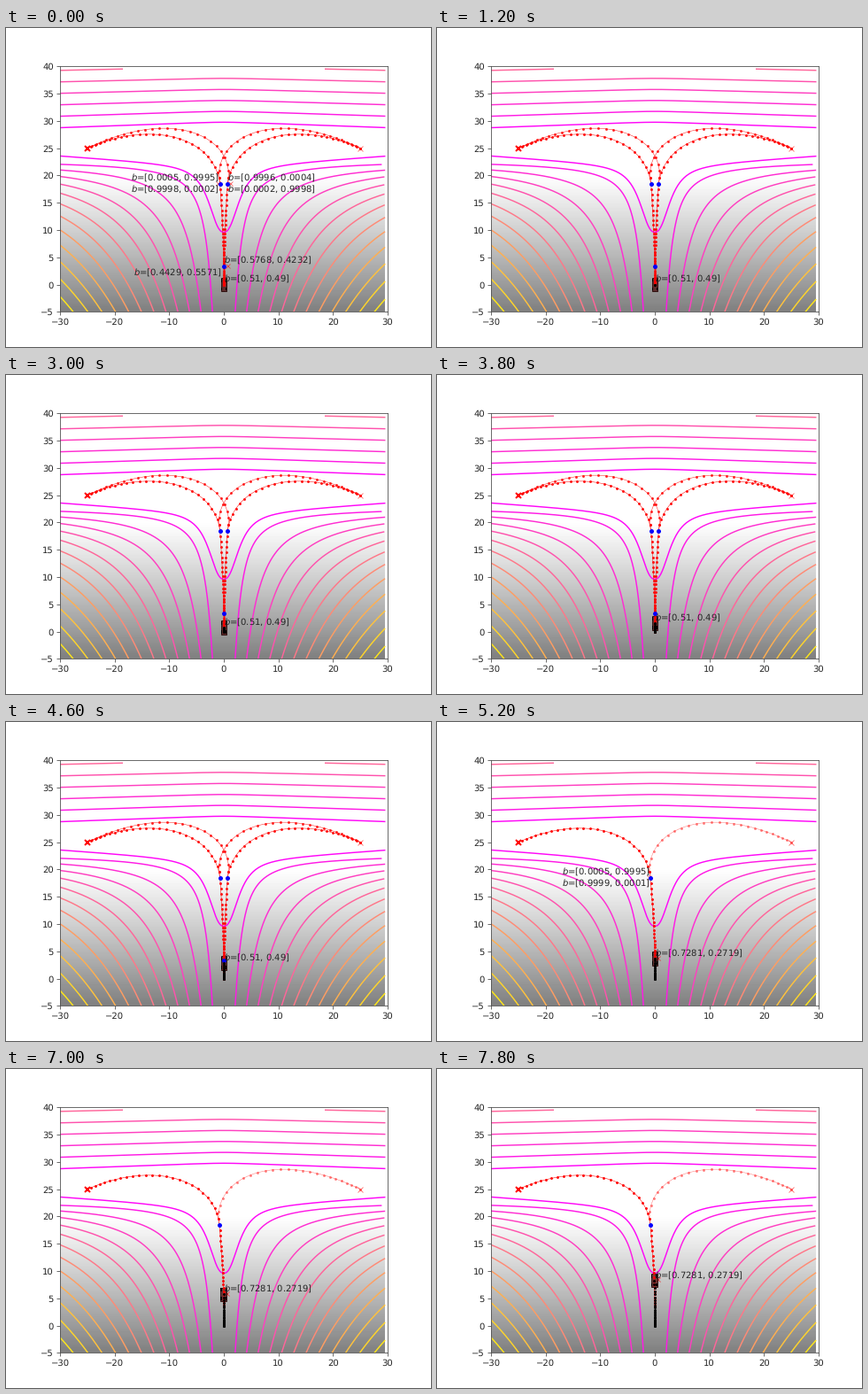
Recreate the animation shown at these times as a matplotlib script. Size 480 px wide and 360 px high, loop 8 s.

```python
import numpy as np
import matplotlib.pyplot as plt
from matplotlib.animation import FuncAnimation
from matplotlib.patches import Rectangle

plt.rcParams.update({"text.hinting": "none", "text.hinting_factor": 1})

PX = 0.96  # points per pixel at 75 dpi
RED = "#ff0000"
INK = "#262626"
X_END, Y_END = 29.5, 39.5

fig = plt.figure(figsize=(6.4, 4.8), dpi=75)
ax = fig.add_axes([0.125, 0.11, 0.775, 0.77])
ax.set_aspect("equal")
ax.set_xlim(-30, 30)
ax.set_ylim(-5, 40)
ax.set_xticks(range(-30, 31, 10))
ax.set_yticks(range(-5, 41, 5))
ax.tick_params(color="#505050", labelcolor=INK)
for spine in ax.spines.values():
    spine.set_color("#505050")


# ---------- static field ----------
def shade():
    y = np.linspace(-5, 40, 360)
    depth = np.clip((20 - y) / 25, 0, 1)
    ax.imshow((1 - 0.5 * depth ** 1.1)[:, None], cmap="gray", vmin=0, vmax=1,
              extent=(-30, X_END, -5, 40), origin="lower", aspect="equal",
              interpolation="bilinear", zorder=0)
    ax.set_xlim(-30, 30)
    ax.set_ylim(-5, 40)


def level_line(x, y, level):
    keep = (x <= X_END) & (y <= Y_END)
    ax.plot(np.where(keep, x, np.nan), np.where(keep, y, np.nan),
            color=plt.cm.spring(0.03 + 0.073 * level), lw=1.4, zorder=1)


def reach(m):
    """Distance from the corridor at which level m meets the bottom."""
    return 2.05 * m + 0.0015 * m**3


def contours():
    x = np.linspace(-30, 30, 481)
    a = abs(x)
    # closed end of the valley
    level_line(x, 9.6 + 11.9 * a**2.5 / (a**2.5 + 16) + 0.07 * a, 0)
    # hyperbola-like lines on both sides of the corridor
    for m in range(1, 13):
        q = np.linspace(m, 13, 300)
        side = 30 * reach(m) / reach(q)
        y = 23 - (2.1 * q - 4.4 * np.sin(np.pi * q / 12))
        level_line(-side, y, m)
        level_line(side, y, m)
    # nearly flat lines above
    for k in range(6):
        rise = 0.6 + 0.4 * (1 - k / 5) ** 1.5
        y = 28.75 + 2.1 * k + rise * (1 - (np.sqrt(x**2 + 9) - 3) / 27.15)
        level_line(x, y, k)


# ---------- motion ----------
def travel(t):
    """Height of the car after t steps."""
    t = np.asarray(t, float)
    early = 0.00525 * t**2 + 0.0002 * t**3
    s = t - 20
    return np.where(t < 20, early, 3.7 + 0.45 * s + 0.015 * s**2)


def drift(t):
    return -0.8 * (np.clip(np.asarray(t, float) - 20, 0, None) / 20) ** 2


def stem(y0, x1):
    """Steps 20 to 40, from the first node to the second."""
    t = np.arange(20, 41)
    y = y0 + (travel(t) - 3.7) * (18.5 - y0) / 15
    return x1 * ((t - 20) / 20) ** 2, y


def branch(x0, p1, p2, end, steps=26):
    """Bezier curve sampled with a speed that rises, then falls."""
    u = np.linspace(0, 1, 600)
    b = [(1 - u) ** 3, 3 * u * (1 - u) ** 2, 3 * u**2 * (1 - u), u**3]
    pts = [(x0, 18.5), p1, p2, end]
    x = sum(c * p[0] for c, p in zip(b, pts))
    y = sum(c * p[1] for c, p in zip(b, pts))
    arc = np.append(0, np.cumsum(np.hypot(np.diff(x), np.diff(y))))
    k = np.linspace(0, 1, steps + 1)
    s = k + 0.65 * k**2 - 1.6 / 3 * k**3
    s *= arc[-1] / s[-1]
    return np.interp(s, arc, x), np.interp(s, arc, y)


def near(x0, side):
    return branch(x0, (side * 1.8, 27), (side * 13, 30.3), (side * 25, 25))


def far(x0, side):
    return branch(x0, (-side * 2.5, 26.5), (side * 8.5, 33), (side * 25, 25))


# ---------- artists ----------
def dots(xy, alpha):
    return ax.plot(*xy, color=RED, alpha=alpha, lw=0.5, marker="o",
                   ms=2.9 * PX, mew=0, zorder=4)[0]


def node(x, y):
    return ax.plot(x, y, "o", color="#0000ff", ms=5 * PX, mew=0, zorder=5)[0]


def cross(x, y, size, width, alpha):
    return ax.plot(x, y, "x", color=RED, ms=size * PX, mew=width * PX,
                   alpha=alpha, zorder=3)[0]


def label(text, x, y, dx=0, dy=7, ha="left"):
    return ax.annotate(f"$b$=[{text}]", (x, y), (dx, dy), color=INK,
                       textcoords="offset pixels", ha=ha, va="center",
                       fontsize=10, zorder=8)


shade()
contours()
cross(-25, 25, 6.5, 2, 1)
cross(25, 25, 6, 1, 0.5)

ROOT = "0.51, 0.49"
NEXT = "0.7281, 0.2719"

t0 = np.arange(21)
plan_a = [dots((0 * t0, 0.9 * travel(t0)), 0.95), node(0, 3.35)]
for s in (-1, 1):
    plan_a += [dots(stem(3.35, 0.7 * s), 0.95), dots(near(0.7 * s, s), 0.95),
               dots(far(0.7 * s, -s), 0.85), node(0.7 * s, 18.5)]

plan_b = [dots(stem(3.7, -0.8), 1), dots(near(-0.8, -1), 1),
          dots(far(-0.8, 1), 0.5), node(-0.8, 18.5)]

notes_a = [
    label("0.5768, 0.4232", 0, 3.35),
    label("0.4429, 0.5571", 0, 3.35, -1.5, -6.5, "right"),
    label("0.9996, 0.0004", 0.7, 18.5, -0.5),
    label("0.0002, 0.9998", 0.7, 18.5, -0.5, -6),
    label("0.0005, 0.9995", -0.7, 18.5, -0.5, 7, "right"),
    label("0.9998, 0.0002", -0.7, 18.5, -0.5, -6, "right"),
    cross(-1.1, 18.6, 5, 0.8, 0.6),
    cross(1.1, 18.6, 5, 0.8, 0.6),
    cross(0.6, 3.5, 5, 0.8, 0.6),
]
notes_b = [
    label("0.0005, 0.9995", -0.8, 18.5, -0.5, 7, "right"),
    label("0.9999, 0.0001", -0.8, 18.5, -0.5, -6, "right"),
    cross(-1.2, 18.6, 5, 0.8, 0.6),
]

LENGTH, WIDTH = 2.5, 1.1
body = ax.add_patch(Rectangle((0, 0), WIDTH, LENGTH, fc=(0.3, 0.04, 0.04, 0.75),
                              ec=(0.12, 0, 0, 0.85), lw=0.9, zorder=3.5))
wheels = [ax.add_patch(Rectangle((0, 0), 0.22, 0.6, fc="black", ec="none",
                                 zorder=3.6)) for _ in range(4)]
trail, = ax.plot([], [], "o", color="black", ms=3 * PX, mew=0, zorder=6)
marker = cross(0, 0, 5, 0.9, 0.65)
belief = label(ROOT, 0, 0, dy=6.6)


def show(group, on):
    for artist in group:
        artist.set_visible(on)


def schedule(i):
    """Step number, whether the second plan holds, whether notes show."""
    if i < 5:
        return 0, False, True
    if i < 26:
        return i - 5, False, False
    if i < 31:
        return 20, True, True
    return i - 11, True, False


def draw(i):
    t, second, notes = schedule(i)
    show(plan_a, not second)
    show(plan_b, second)
    show(notes_a, notes and not second)
    show(notes_b, notes and second)

    x, y = float(drift(t)), float(travel(t))
    body.set_xy((x - WIDTH / 2, y - LENGTH / 2))
    spots = [(sx, sy) for sx in (-1, 1) for sy in (-1, 1)]
    for wheel, (sx, sy) in zip(wheels, spots):
        wheel.set_xy((x + 0.45 * sx - 0.11, y + 0.8 * sy - 0.3))

    past = np.arange(t + 1) if t else np.array([])
    trail.set_data(drift(past), travel(past))
    marker.set_data([x + 0.55], [y + 0.2])
    marker.set_visible(second)
    belief.xy = (0, y)
    belief.set_text(f"$b$=[{NEXT if second else ROOT}]")
    return []


anim = FuncAnimation(fig, draw, frames=40, interval=200, repeat=True,
                     repeat_delay=0, init_func=lambda: draw(0), blit=False)
plt.show()
```
